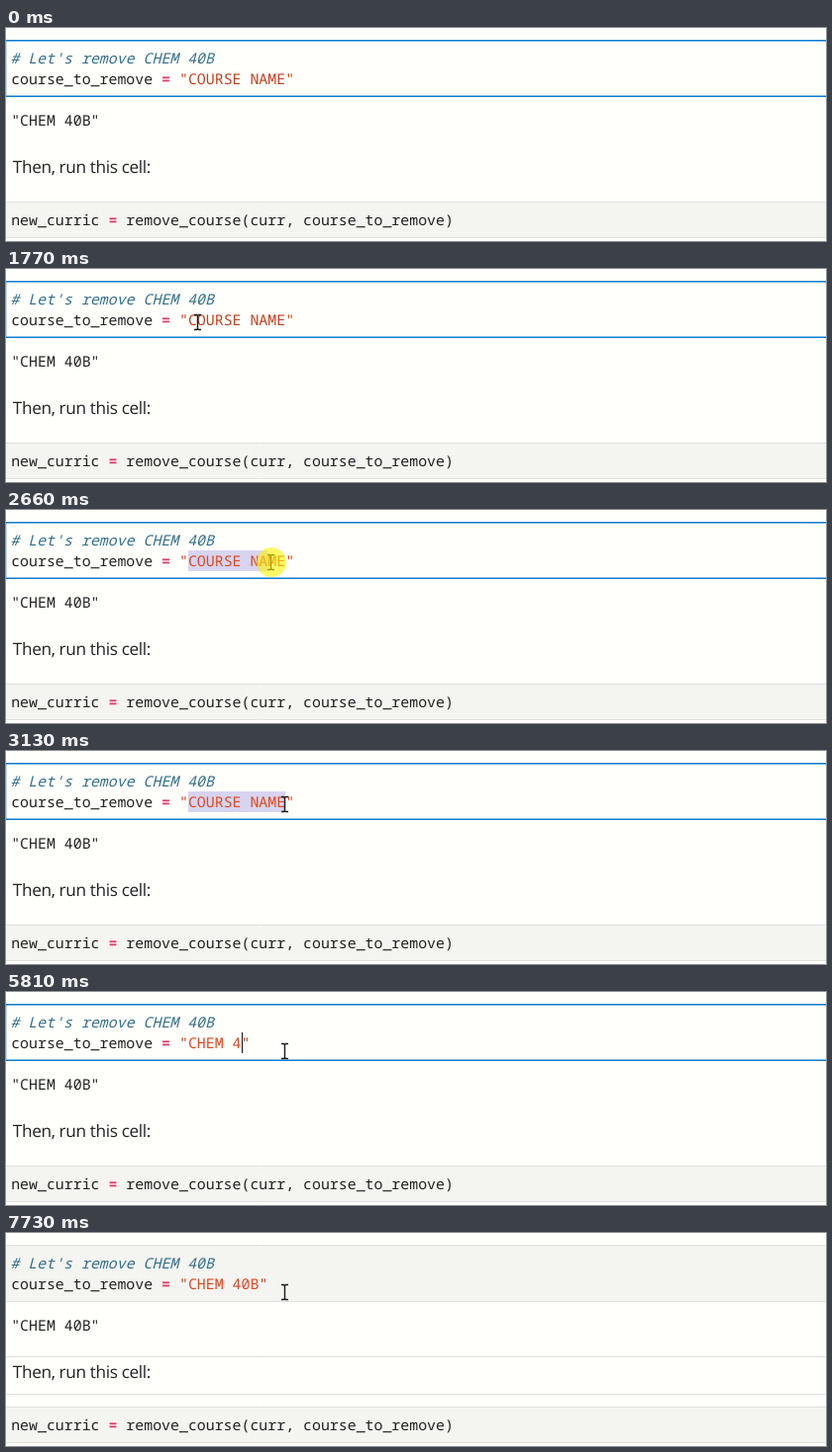
These frames come from a looping animation (828x216 px, 8 s). An HTML page:

```html
<!DOCTYPE html>
<html lang="en">
<head>
<meta charset="utf-8">
<title>Notebook cell edit</title>
<style>
  html, body { margin: 0; width: 100%; height: 100%; overflow: hidden; background: #fffffc; }
  svg { display: block; }
  text { white-space: pre; text-rendering: geometricPrecision; fill: #222; }
  .code { font: 14.9px "Noto Sans Mono", monospace; }
  .prose { font: 17.2px "Open Sans", sans-serif; letter-spacing: -.35px; }
  .note { font-style: italic; fill: #35708c; }
  .op { font-weight: 600; fill: #e5356b; }
  .str { fill: #c4401f; }
  .rule { fill: none; stroke: #e0e0de; }
</style>
</head>
<body>
<svg width="828" height="216" viewBox="0 0 828 216">
  <rect width="828" height="216" fill="#fffffc"/>

  <g id="idle">
    <rect y="12" width="828" height="58" fill="#f4f4f1"/>
    <path class="rule" d="M0 12.5H828M0 69.5H828M0 125.5H828M0 163.5H828"/>
  </g>
  <g id="focus">
    <path d="M.5 13V69" stroke="#c8e2f5"/>
    <path d="M0 12.75H828M0 69.25H828" stroke="#0a7ad0" stroke-width="1.5"/>
  </g>
  <rect y="176" width="828" height="37" fill="#f4f4f1"/>
  <path class="rule" d="M0 176.5H828M0 212.5H828"/>

  <rect id="sel" y="41" height="21" fill="#d7d4f0"/>

  <text class="code note" x="4.5" y="36"># Let's remove CHEM 40B</text>
  <text class="code" x="5.2" y="57">course_to_remove <tspan class="op">=</tspan> <tspan class="str">"<tspan id="value"></tspan>"</tspan></text>
  <text class="code" x="5.2" y="99">"CHEM 40B"</text>
  <text class="prose" x="6.8" y="147">Then, run this cell:</text>
  <text class="code" x="5.2" y="200">new_curric <tspan class="op">=</tspan> remove_course(curr, course_to_remove)</text>

  <rect id="caret" y="41" width="1" height="21" fill="#111"/>
  <path id="beam" d="M-3.5 -7.5H-1L0 -6.5L1 -7.5H3.5M0 -6.5V6.5M-3.5 7.5H-1L0 6.5L1 7.5H3.5"
        fill="none" stroke="#1a1a1a" stroke-width="1.4"/>
  <path id="arrow" d="M.5 .5V16.5L4.2 13L6.8 19L9.2 18L6.6 12.2H11.5Z"
        fill="#fff" stroke="#222" stroke-linejoin="round"/>
  <circle id="halo" r="15" fill="#fff200" fill-opacity=".6"/>
</svg>

<script>
const LOOP = 8000, STEP = 68, BLINK = 530;
const LEFT = 5.2, ADV = 8.94, FIRST = 20, CELL_END = 69;
const ENTER = 190, PRESS = 2310, RELEASE = 3130, BLUR = 7730;
const OLD = "COURSE NAME", NEW = "CHEM 40B";
const keyTimes = [4260, 4390, 4660, 4730, 5330, 5810, 5940, 6410];

// pointer moves, each from where the last one ended
const entry = { x: 695, y: 176 };
const moves = [
  { from: ENTER, to: 950, x: 199.5, y: 65, power: 3 },
  { from: 1020, to: 1300, x: 196.5, y: 54.5, power: 2 },
  { from: 1700, to: 2110, x: 186, y: 52, power: 2 },
  { from: PRESS, to: 2930, x: 281, y: 53.5, power: 2.5 },
  { from: 3330, to: 3400, x: 281.5, y: 60, power: 1 }
];

const $ = id => document.getElementById(id);
const clamp = (v, lo, hi) => Math.max(lo, Math.min(hi, v));
const easeOut = (k, power) => 1 - (1 - k) ** power;
const colX = col => LEFT + col * ADV;

function show(id, on) {
  $(id).setAttribute("visibility", on ? "visible" : "hidden");
}

function place(id, x, y) {
  $(id).setAttribute("transform", `translate(${x} ${y})`);
}

function pointer(t) {
  let { x, y } = entry;
  for (const m of moves) {
    if (t < m.from) break;
    const seen = Math.floor((t - m.from) / STEP + .25) * STEP;
    const k = clamp(seen / (m.to - m.from), 0, 1);
    x += (m.x - x) * easeOut(k, m.power);
    y += (m.y - y) * easeOut(k, m.power * .58);
  }
  return { x, y };
}

function drawPointer(t, { x, y }) {
  const inCell = y < CELL_END;
  place("arrow", Math.round(x), Math.round(y));
  place("beam", Math.floor(x) + .5, Math.round(y));
  place("halo", x, y);
  show("arrow", t >= ENTER && !inCell);
  show("beam", t >= ENTER && inCell);
  show("halo", t >= PRESS && t < RELEASE);
}

function drawEditor(t, { x }) {
  const typed = keyTimes.filter(k => k <= t).length;
  const selecting = t >= PRESS && !typed;
  const end = clamp(Math.round((x - LEFT) / ADV), FIRST, FIRST + OLD.length);
  $("sel").setAttribute("x", colX(FIRST));
  $("sel").setAttribute("width", (end - FIRST) * ADV);
  show("sel", selecting);

  $("value").textContent = typed ? NEW.slice(0, typed) : OLD;
  $("value").style.fill = t < PRESS ? "" : "#de4a20";

  const sinceKey = t - keyTimes[typed - 1];
  const lit = Math.floor(sinceKey / BLINK) % 2 === 0;
  $("caret").setAttribute("x", Math.round(colX(FIRST + typed)));
  show("caret", typed && lit && t < BLUR);
  show("focus", t < BLUR);
  show("idle", t >= BLUR);
}

const start = performance.now();
function tick() {
  const t = (performance.now() - start) % LOOP;
  const p = pointer(t);
  drawPointer(t, p);
  drawEditor(t, p);
  requestAnimationFrame(tick);
}
tick();
</script>
</body>
</html>
```
